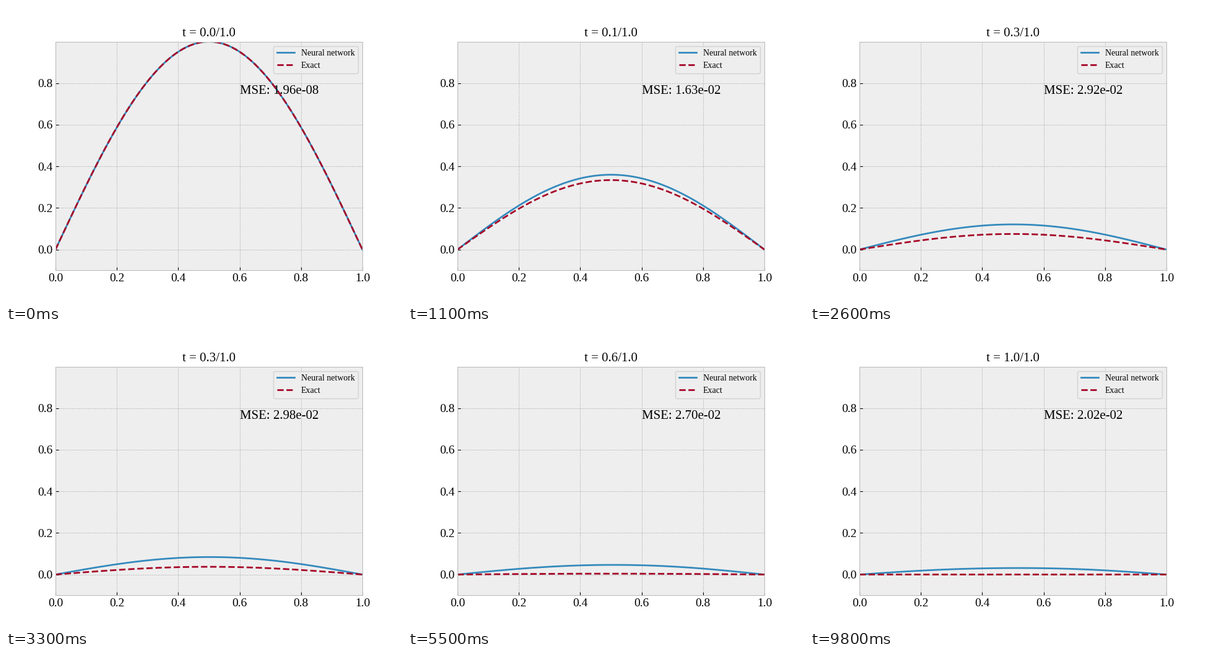
Animation of 640x480 px, one loop 9900 ms. Source, as a matplotlib script:

```python
import numpy as np
import matplotlib.pyplot as plt
from matplotlib.animation import FuncAnimation

plt.rcParams.update({
    "font.family": "Liberation Serif",
    "font.size": 10,
    "text.hinting_factor": 8,
    "axes.facecolor": "#eeeeee",
    "axes.edgecolor": "#bcbcbc",
    "axes.grid": True,
    "grid.color": "#b2b2b2",
    "grid.linestyle": "--",
    "grid.linewidth": 0.5,
    "xtick.direction": "in",
    "ytick.direction": "in",
    "lines.linewidth": 2,
})

FRAMES = 99
x = np.linspace(0, 1, 100)

# Mean error over time: step, value and slope per step, in units of 1e-4
KNOTS = [
    (0, 1.96e-4, 12), (11, 163, 14), (20, 263, 7.5), (33, 298, -0.3),
    (55, 270, -1.8), (74, 236.1, -0.77), (82, 229.94, -0.77), (98, 202, -1.9),
]


def mean_error(step):
    """Cubic Hermite curve through the knots."""
    for (a, ya, ma), (b, yb, mb) in zip(KNOTS, KNOTS[1:]):
        if step <= b:
            break
    h = b - a
    s = (step - a) / h
    value = ((1 + 2 * s) * (1 - s) ** 2 * ya + s * (1 - s) ** 2 * h * ma
             + s * s * (3 - 2 * s) * yb + s * s * (s - 1) * h * mb)
    return value * 1e-4


def exact(t):
    return np.exp(-np.pi ** 2 * t) * np.sin(np.pi * x)


def error_shape(t):
    bump = (np.sin(np.pi * x) - 0.022 * t * np.sin(2 * np.pi * x)
            + 0.02 * t * np.sin(3 * np.pi * x))
    return bump / bump.mean()


fig, ax = plt.subplots(figsize=(6.4, 4.8), dpi=100)
ax.set_xlim(0, 1)
ax.set_ylim(-0.1, exact(0).max())
ax.tick_params(labelsize=14)

net_line, = ax.plot([], [], color="#348abd", label="Neural network")
exact_line, = ax.plot([], [], "--", color="#a60628", label="Exact")
ax.legend(loc="upper right")
title = ax.set_title("", fontsize=15)
label = ax.text(0.6, 0.75, "", fontsize=15)


def update(step):
    t = step / FRAMES
    err = mean_error(step)
    u = exact(t)
    net_line.set_data(x, u + err * error_shape(t))
    exact_line.set_data(x, u)
    title.set_text(f"t = {t:.1f}/1.0")
    label.set_text(f"MSE: {err:.2e}")
    return net_line, exact_line, title, label


anim = FuncAnimation(fig, update, frames=FRAMES, interval=100,
                     repeat=True, repeat_delay=0, blit=False)
plt.show()
```
